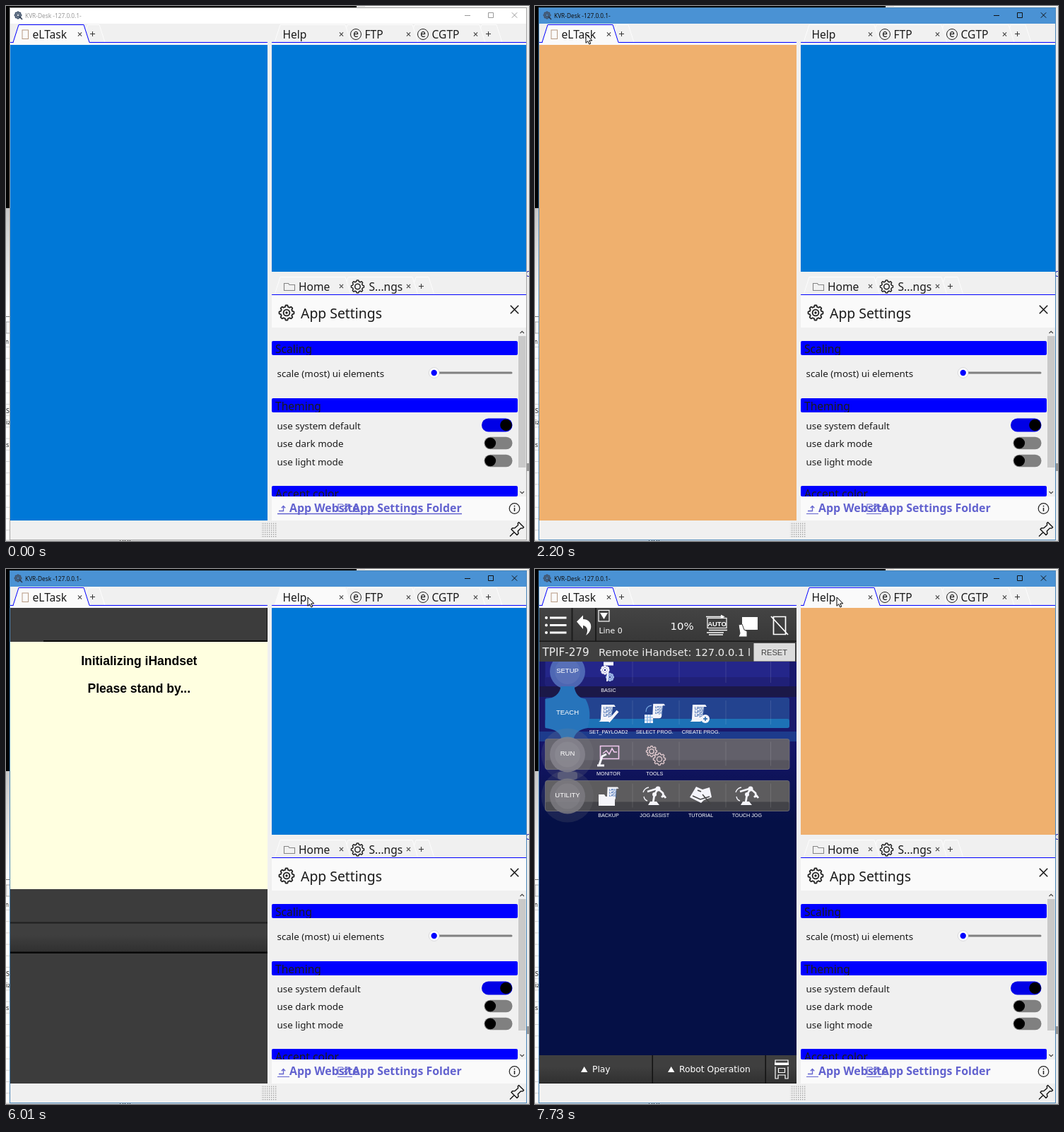
An HTML page for the animation above (8 s loop, 740x757 px).

```html
<!DOCTYPE html>
<html lang="en">
<head>
<meta charset="utf-8">
<title>Tabbed tool window</title>
<style>
html,body{margin:0;width:100%;height:100%;overflow:hidden;background:#fff}
svg{display:block;width:740px;height:757px}
text{font-family:"Noto Sans","Open Sans",sans-serif;white-space:pre}
.v{font-family:"DejaVu Sans",sans-serif}
.a{font-family:"Liberation Sans",Arial,sans-serif}
</style>
</head>
<body>
<svg id="stage" viewBox="0 0 740 757" xmlns="http://www.w3.org/2000/svg"></svg>
<script>
const LOOP = 8000, BLUE = '#0078d7', ORANGE = '#efb06e', DARK = '#3c3c3c';

const rect = (x, y, w, h, fill, more = '') =>
  `<rect x="${x}" y="${y}" width="${w}" height="${h}" fill="${fill}" ${more}/>`;
const text = (x, y, size, str, fill = '#1b1b1b', more = '') =>
  `<text x="${x}" y="${y}" font-size="${size}" fill="${fill}" ${more}>${str}</text>`;
const line = (d, color, w = 1, more = '') =>
  `<path d="${d}" fill="none" stroke="${color}" stroke-width="${w}" ${more}/>`;
const shape = (d, fill, more = '') => `<path d="${d}" fill="${fill}" ${more}/>`;
const disc = (x, y, r, fill, more = '') => `<circle cx="${x}" cy="${y}" r="${r}" fill="${fill}" ${more}/>`;
const group = (id, body, more = '') => `<g id="${id}" ${more}>${body}</g>`;
const at = (x, y, body) => `<g transform="translate(${x} ${y})">${body}</g>`;
const clip = (id, x, y, w, h) => `<clipPath id="${id}">${rect(x, y, w, h, '#000')}</clipPath>`;
const mid = 'text-anchor="middle"';
const range = n => [...Array(n).keys()];

function gear(x, y, r, color, w = 1.3, teeth = 8) {
  const pts = range(96).map(i => {
    const a = i / 96 * Math.PI * 2;
    const q = r * (0.9 + 0.1 * Math.max(-1, Math.min(1, 2.2 * Math.cos(a * teeth))));
    return (x + q * Math.cos(a)).toFixed(1) + ' ' + (y + q * Math.sin(a)).toFixed(1);
  });
  return line('M' + pts.join('L') + 'Z', color, w) + disc(x, y, r * 0.42, 'none', `stroke="${color}" stroke-width="${w}"`);
}

const cross = (x, y, s, color, w = 1) =>
  line(`M${x - s} ${y - s}l${2 * s} ${2 * s}m0 ${-2 * s}l${-2 * s} ${2 * s}`, color, w);
const plus = (x, y) => line(`M${x - 3.5} ${y}h7m-3.5 -3.5v7`, '#333');
const tabPath = (x1, x2, y) => `M${x1} ${y + 25}l8 -25H${x2 - 8}l8 25`;
const tab = (x1, x2, y) => shape(tabPath(x1, x2, y), '#f1f1f1', 'stroke="#fdfdfd"');

function backdrop() {
  let s = rect(0, 0, 740, 757, '#fff') + rect(0, 0, 496, 3, '#000') + rect(496, 0, 244, 3, '#e4e4e4') +
    rect(508, 0, 232, 1, '#fff') + rect(0, 0, 6, 286, '#000') +
    rect(0, 286, 6, 154, 'url(#drop)') + rect(0, 439, 6, 1, '#777') + rect(0, 447, 6, 16, '#f4f4f4', 'stroke="#888" stroke-width=".7"');
  s += range(17).map(i => rect(0, 482 + 16.2 * i, 6, 1, '#d5d5d5')).join('');
  s += text(-1, 478, 8, 'n') + text(0, 576, 9, 'S') + text(0, 592, 9, 'iz') + text(0, 624, 9, 's') +
    rect(736, 3, 4, 754, '#ececec') + text(735, 383, 11, 'C', '#1212b0') + rect(737, 647, 3, 11, '#999') +
    rect(0, 755, 740, 2, '#dadada') + text(158, 760, 8, 'a g g');
  return s;
}

function frame() {
  return rect(5, 2, 732, 753.5, '#f0f0f0') + rect(5.5, 2.5, 731, 22.5, '#fff', 'id="bar"') +
    gear(17, 13, 4.6, '#41536b', 1.6) + line('M19 15l4 4', '#2b3a50', 1.6) +
    text(27, 16.5, 8.3, 'KVR-Desk -127.0.0.1-', '#999', 'id="title"') +
    group('ctl', line('M649 13.5h8', 'currentColor') + line('M682.5 9.5h7v7h-7z', 'currentColor') + cross(719.5, 13, 3.7, 'currentColor'), 'color="#999"');
}

function leftTabs() {
  return tab(108, 140, 26.5) + line('M6 51.5h364', '#00f') + rect(6, 52, 364, 3, '#fafafa') +
    shape(tabPath(10, 118, 26.5), '#fafafa', 'stroke="#00f"') + rect(11, 51, 106.5, 1.5, '#fafafa') +
    rect(23, 34, 8.5, 12.5, 'none', 'stroke="#b79a83"') + text(37.5, 45.5, 15.6, 'eLTask') +
    cross(104.5, 40, 2.6, '#444', 1.1) + plus(122.5, 39.5);
}

const eIcon = x => disc(x, 40, 7.5, 'none', 'stroke="#222"') + text(x, 44.3, 13.5, 'e', '#111', mid);

function rightTabs() {
  return tab(665, 702, 26.5) + tab(570, 678, 26.5) + tab(475, 583, 26.5) + tab(380, 488, 26.5) +
    rect(376, 52, 360, 3, '#fafafa') + group('hover', shape(tabPath(380, 488, 26.5), '#fafafa')) +
    line('M376 51.5h360', '#00f') +
    group('active', shape(tabPath(380, 488, 26.5), '#fafafa', 'stroke="#00f"') + rect(381, 51, 106.5, 1.5, '#fafafa')) +
    text(391.5, 45.5, 15.6, 'Help') + eIcon(495) + text(507.5, 45.5, 15.6, 'FTP') + eIcon(590) +
    text(602.5, 45.5, 15.6, 'CGTP') + [474.5, 569.5, 664.5].map(x => cross(x, 40, 2.6, '#444', 1.1)).join('') + plus(682.5, 39.5) +
    rect(376, 55, 360, 321, BLUE, 'id="rightPane"');
}

const header = (y, h, str, id) => clip(id, 376, y, 348, h) +
  rect(376, y, 348, h, '#00f', 'rx="2"') + text(381, y + 17, 15.6, str, '#1b1b1b', `clip-path="url(#${id})"`);

const toggle = (y, on) => on
  ? rect(673, y - 9.5, 43.5, 19, '#0000e6', 'rx="9.5"') + disc(707.5, y, 8.3, '#000')
  : rect(676.5, y - 8.7, 40, 17.4, '#808080', 'rx="8.7"') + disc(685.3, y, 7.8, '#000');

function settings() {
  const link = '#6262cf', bold = 'font-weight="700"';
  let s = tab(572, 606, 383.5) + tab(476, 583, 383.5) + tab(380, 488, 383.5) + line('M376 408.5h360', '#00f') +
    line('M393.5 402.5v-10h6l1.5 2h7.5v8z', '#858585', 1.1) + text(414, 402.5, 15.6, 'Home') +
    gear(497.5, 397, 9, '#222', 1.5) + text(513.5, 402.5, 15.6, 'S...ngs') +
    cross(474.5, 396.5, 2.6, '#444', 1.1) + cross(569.5, 396.5, 2.6, '#444', 1.1) + plus(587.5, 396.5);
  s += rect(376, 409, 360, 46, '#fafafa') + gear(397, 434, 10.5, '#222', 1.8) + disc(397, 434, 1.7, '#222') +
    text(417, 442, 19.4, 'App Settings') + cross(719.5, 429.5, 5.7, '#111', 1.5);
  s += header(474, 20, 'Scaling', 'c1') + header(555, 20, 'Theming', 'c2') + header(679, 15, 'Accent color', 'c3');
  s += text(383.5, 524.5, 13.4, 'scale (most) ui elements') + rect(606, 517.5, 110.5, 3, '#808080', 'rx="1.5"') +
    disc(605.7, 519, 7.4, '#fff', 'stroke="#ccc" stroke-width=".7"') + disc(605.7, 519, 4.2, '#00f');
  s += ['use system default', 'use dark mode', 'use light mode'].map((t, i) =>
    text(383.5, 599 + i * 25.3, 13.4, t) + toggle([593, 618.5, 643.5][i], !i)).join('');
  s += rect(724.5, 456, 12, 238, '#f0f0f0') + rect(725, 467, 10.5, 186, '#c9c9c9') +
    line('M727.5 463l2.7 -2.7 2.7 2.7M727.5 687l2.7 2.7 2.7 -2.7', '#444', 1.2);
  s += rect(376, 694, 360, 34, '#fafafa') + line('M386 714.5h6.5v-7m-2.7 2.7l2.7 -2.7 2.7 2.7', link, 1.3) +
    text(401, 716, 15.9, 'App Website', link, bold) + text(490, 716, 15.9, 'App Settings Folder', link, bold) +
    line('M470 715v-10h6l1.5 2h8M470 715h12l4 -8M478 712l8 -7m-4 0h4v4', link, 1.1) + line('M384 718.5h17m68 0h21', link) +
    group('under', line('M384 718.5h261', link, 1.6)) +
    disc(719.5, 711, 7.3, 'none', 'stroke="#222" stroke-width="1.2"') + line('M719.5 710v5m0 -8.2v1.6', '#222', 1.5);
  return s;
}

function statusBar() {
  return rect(6, 728, 730.5, 27, '#f0f0f0') + rect(361, 730, 22, 23, 'url(#dots)') +
    at(722.5, 741, line('M-9.5 9.5l6 -6M-7.5 -0.5l8 8 2 -2 -.7 -3.5 4 -4 3 -.2 1.3 -1.3 -7 -7 -1.3 1.3 .3 2.7 -4.5 4 -3.6 .3z', '#111', 1.4, 'stroke-linejoin="round"'));
}

function panel() {
  return rect(6, 55, 364, 673, DARK) + rect(53, 101, 317, 2, '#0a0a0a') + rect(369, 55, 1, 47, '#111') +
    rect(6, 499.5, 364, 2, '#202020');
}

function splash() {
  const b = mid + ' class="a" font-weight="700"';
  return rect(6, 103, 364, 350, '#ffffe0') + text(188.3, 136, 17.5, 'Initializing iHandset', '#000', b) +
    text(188.3, 174.5, 17.5, 'Please stand by...', '#000', b);
}

function tools() {
  const w = '#fff';
  return rect(6, 55, 364, 47, 'url(#top)') + rect(6, 101.5, 364, 1.5, '#181818') +
    rect(51.5, 55, 2, 47, '#1c1c1c') + rect(85, 55, 2, 47, '#1c1c1c') +
    [69, 79.5, 90].map(y => disc(16, y, 2, w) + rect(21, y - 1.5, 23.5, 3, w)).join('') +
    shape('M59 74.5l9 -9v5.5c8 0 12.5 6 11 13 -1 4.5 -4 8 -7 10 4 -7 2 -13 -4 -14v5z', w) +
    rect(90, 58.5, 15, 15.5, 'none', `stroke="${w}" stroke-width="1.2"`) + shape('M92 62h11l-5.5 9z', w) +
    text(191.5, 86, 14.9, '10%', w, 'class="v"') +
    rect(244, 69.5, 27, 14, 'none', `stroke="${w}" stroke-width="1.2"`) + text(257.5, 80.5, 9.5, 'AUTO', w, mid + ' class="a" font-weight="700"') +
    line('M242 67.5h24m-3 -2l4 2 -4 2M246 86.5h26M243 90h24M246 93h20', w, 1.5) +
    rect(293, 68, 22, 18, w) + shape('M288 79l5 -1 3 8 4 2v8h-12l2 -5z', w, 'stroke="#3c3c3c"') +
    line('M337.5 67.5h17v25h-17zM334 67l24 26', w, 1.7);
}

function message() {
  return text(90.5, 91, 10.9, 'Line 0', '#fff', 'class="v"') + rect(6, 103, 364, 28, '#404040') +
    '<g clip-path="url(#msg)">' + text(10.5, 123.3, 15.2, 'TPIF-279', '#ececec', 'class="v"') +
    text(90, 123.3, 14.7, 'Remote iHandset: 127.0.0.1 l', '#ececec', 'class="v"') + '</g>' +
    rect(309.5, 105, 58.5, 25.5, '#dcdcdc') + text(338.5, 122, 11.1, 'RESET', '#444', mid + ' class="a"');
}

const tray = () => rect(6, 453, 364, 48, '#e6e6e6') + rect(9, 456.5, 46.5, 40.5, '#6e6e6e') +
  range(9).map(i => rect(25 + i % 3 * 5.5, 463 + (i / 3 | 0) * 5.5, 4, 4, '#fff')).join('');

const keyBar = () => rect(6, 502, 364, 40, 'url(#key)') + rect(6, 541.5, 364, 2.5, '#080808');
const keyText = () => rect(165.5, 502, 1.5, 40, '#111') + rect(325.5, 502, 1.5, 40, '#111') +
  shape('M65 526l4.7 -8 4.7 8zM188 526l4.7 -8 4.7 8z', '#fff') +
  text(81, 526.2, 12.3, 'Play', '#fff', 'class="v"') + text(204, 526.2, 12.3, 'Robot Operation', '#fff', 'class="v"') +
  line('M340 513v-4h18v4M340 518v17h4v-5h10v5h4v-17', '#fff', 1.2) + rect(339, 512.5, 20, 3.5, '#fff') +
  line('M344.5 520.5h9v6h-9z', '#fff', 1.2);

// name, band top, band colours, bubble colour
const rows = [
  ['SETUP', 123, '#24268a', '#202078', '#5672bd'], ['TEACH', 182, '#23438f', '#1d72b6', '#2774bb'],
  ['RUN', 240.5, '#62606a', '#56545e', '#86848d'], ['UTILITY', 299.5, '#5d5c5e', '#434348', '#7c7b80']
];

function menu() {
  let s = rect(6, 131, 364, 557, '#051046') + rect(6, 131, 364, 114, '#19196c') + rect(6, 166, 364, 15, '#1b1848') +
    rect(6, 230, 364, 14, '#204a9a', 'opacity=".7"') + rect(6, 244, 364, 113, 'url(#fade)');
  rows.forEach(([name, y, c1, c2, bub], i) => {
    const cy = y + 22;
    s += rect(14.5, y, 345.5, 43, c1, 'rx="3"') + rect(14.5, y + 30, 345.5, 13, c2, 'rx="3"');
    if (i > 1) s += rect(14.5, y, 345.5, 43, 'none', 'rx="3" stroke="#77757d" stroke-width=".7"');
    s += [137.5, 203.5, 269.5, 333].map(x => rect(x, y + 4, 1, 34, '#fff', 'opacity=".12"')).join('');
    if (i > 1) s += disc(46, cy, 37, bub, 'opacity=".18"');
    if (i == 1) s += shape('M14.5 184q20 -2 22 -18h19q2 16 16 18 10 18 3 41 -16 2 -20 15h-17q-3 -13 -23 -15z', bub);
    else s += disc(46, cy, 25, bub, 'opacity=".85"') + disc(46, cy, 18, '#fff', 'opacity=".06"');
    s += text(46, y + 23.8, 9.5, name, '#fff', mid + ' class="a"');
  });
  return s + rect(32, 287, 28, 11, rows[2][4], 'opacity=".45" rx="4"');
}

const w = '#f4f4fa';
const sheet = (x, y, s = 1) => `<g transform="translate(${x} ${y}) scale(${s})">` +
  shape('M-8 -12h18l2 3h-4l-2 18q-1 3 -4 3h-14q3 -1 3 -4z', w) +
  [-7, -2, 3].map((v, i) => text(-5, v + 2, 5, `LP[${i + 1}]`, '#2a5aa8', 'class="a" font-weight="700"')).join('') + '</g>';
const arm = (x, y) => at(x, y, line('M-1 11l2 -12 5 -8 7 6 1 6M14 0l-3 3m3 -3l3 4M-9 -5l13 -4', w, 2.8, 'stroke-linejoin="round"') +
  shape('M-8 14l3 -5h9l4 5z', w) + disc(1, -1, 3, w) + disc(6, -9, 3.5, w) + line('M-15 -4q2 -6 8 -7M-14 2q1 5 5 6', w, 1.3));

function icons() {
  let s = gear(99, 143, 5.5, w, 2) + gear(106, 153, 5, '#9bb4e6', 2) + line('M97 134h14', w, 5) + line('M104 139l-2 20', w, 2);
  s += sheet(102, 204) + line('M104 216l13 -15', w, 4) + sheet(174, 201, .85) + rect(155, 206, 12, 12, w) +
    line('M157 202q0 -8 8 -9M159 206v12m4 -12v12M155 210h12m-12 4h12', '#7fb0e6', 1.2) +
    sheet(231, 204) + disc(241, 212, 6, w) + line('M238 212h6m-3 -3v6', '#1d60a8', 1.5);
  s += line('M92.5 250.5h26v18h-26zM96 261l5 -4 4 5 4 -8 3 5h4', '#f0c8ee', 1.6) + line('M91 277l4 -12 6 -3M88 278h10', w, 3) +
    gear(165, 258, 7.5, '#d9c3c8', 1.5) + gear(176, 269, 8.5, '#d9c3c8', 1.5);
  s += sheet(109, 318, .8) + shape('M90 335v-16h8l2 3h13v13z', w) + arm(168, 320) + arm(299, 320) +
    shape('M219 323l9 -15 9 4 10 -3 3 14 -11 4 -4 4z', w) + line('M223 321l11 5 13 -4M230 313l5 2M237 319l12 14', '#444', 1.5);
  const caps = [['BASIC'], ['SET_PAYLOAD2', 'SELECT PROG.', 'CREATE PROG.'], ['MONITOR', 'TOOLS'], ['BACKUP', 'JOG ASSIST', 'TUTORIAL', 'TOUCH JOG']];
  caps.forEach((row, i) => row.forEach((c, j) => s += text(104 + j * 65.3, 173.7 + i * 59, 7.2, c, '#fff', mid + ' class="a"')));
  return s;
}

const grad = (id, a, b, from = 0) => `<linearGradient id="${id}" x2="0" y2="1"><stop offset="${from}" stop-color="${a}"/><stop offset="1" stop-color="${b}"/></linearGradient>`;
const stage = document.getElementById('stage');
stage.innerHTML = '<defs>' + grad('drop', '#c8c8c8', '#fff') + grad('top', '#444', '#383838') + grad('key', '#3f3f3f', '#303030', .4) +
  grad('fade', '#16166a', '#051046') + clip('msg', 6, 103, 300.5, 28) + clip('pane', 6, 55, 364, 673) + clip('body', 6, 131, 364, 557) +
  '<pattern id="dots" width="3" height="3" patternUnits="userSpaceOnUse"><rect width="1.3" height="1.3" fill="#999"/></pattern></defs>' +
  backdrop() + frame() + leftTabs() + rect(6, 55, 364, 673, BLUE, 'id="leftPane"') + rightTabs() + settings() + statusBar() +
  '<g clip-path="url(#pane)">' +
  group('panel', panel()) + group('splash', splash()) + group('tools', tools()) + group('tray', tray()) +
  `<g clip-path="url(#body)">${group('menu', menu())}${group('icons', icons())}</g>` + group('message', message()) +
  group('keys', keyBar() + group('keyText', keyText())) + '</g>' +
  rect(5.5, 2.5, 731, 753, 'none', 'id="edge" stroke="#a5a5a5"') +
  group('cursor', shape('M0 0v12.3l2.8 -2.6 2 4.3 2 -.9 -2 -4.2h4z', '#fff', 'stroke="#000" stroke-linejoin="round"'));

const el = {};
stage.querySelectorAll('[id]').forEach(e => el[e.id] = e);
const show = (id, on) => el[id].setAttribute('display', on ? 'inline' : 'none');
const set = (id, key, v) => el[id].setAttribute(key, v);

// time, x, y
const path = [
  [530, 661, 752], [720, 560, 560], [930, 330, 290], [1130, 160, 120], [1320, 86, 48], [1360, 83, 46], [1470, 72, 40],
  [2900, 72, 40], [3050, 150, 84], [3200, 285, 150], [3330, 385, 184], [3430, 413, 176], [3560, 442, 120], [3700, 459, 71],
  [3850, 460, 50], [4020, 438, 38], [4170, 407, 42], [4390, 427, 40]
];

function pointer(t) {
  const i = path.findIndex(p => p[0] > t);
  if (i < 0) return path[path.length - 1].slice(1);
  if (!i) return path[0].slice(1);
  const [t0, x0, y0] = path[i - 1], [t1, x1, y1] = path[i], k = (t - t0) / (t1 - t0);
  return [x0 + (x1 - x0) * k, y0 + (y1 - y0) * k];
}

function draw(t) {
  const focus = t >= 1900;
  set('bar', 'fill', focus ? '#4a92d4' : '#fff');
  set('title', 'fill', focus ? '#101010' : '#999');
  set('ctl', 'color', focus ? '#111' : '#999');
  set('edge', 'stroke', focus ? '#4a86b8' : '#a5a5a5');
  show('under', !focus);
  set('leftPane', 'fill', t < 2200 ? BLUE : t < 3470 ? ORANGE : '#fff');
  set('rightPane', 'fill', t < 7730 ? BLUE : ORANGE);

  show('panel', t >= 6010);
  show('splash', t >= 6010 && t < 6080);
  show('tools', t >= 6150);
  show('keys', t >= 6010);
  show('keyText', t >= 6290);
  show('message', t >= 6520);
  show('tray', t >= 6550 && t < 6590);
  set('keys', 'transform', `translate(0 ${t < 6590 ? 0 : 186})`);
  show('menu', t >= 6790);
  show('icons', t >= 6830);

  const [x, y] = pointer(t);
  show('hover', t > 3000 && x > 384 && y < 51);
  show('active', t >= 7530);
  show('cursor', t >= 530);
  set('cursor', 'transform', `translate(${x.toFixed(1)} ${y.toFixed(1)})`);
}

const start = performance.now();
function tick() {
  draw((performance.now() - start) % LOOP);
  requestAnimationFrame(tick);
}
tick();
</script>
</body>
</html>
```
